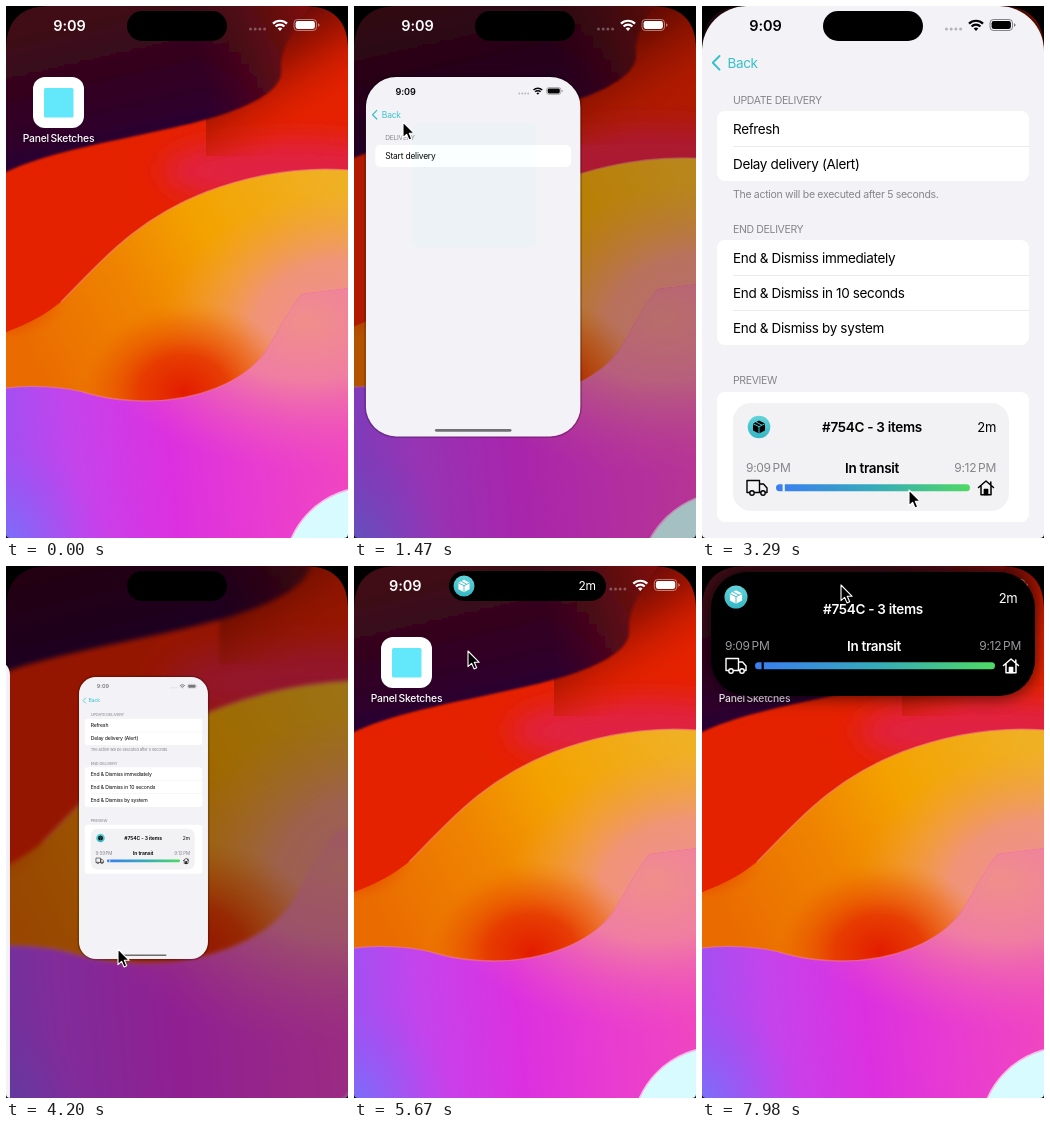
Animation, 342 px wide and 532 px high, one loop 8000 ms. Source, as an HTML page:

```html
<!DOCTYPE html>
<html lang="en">
<head>
<meta charset="utf-8">
<title>Delivery live activity</title>
<style>
html, body { margin: 0; width: 100%; height: 100%; overflow: hidden; background: #000; }
svg { display: block; width: 342px; height: 532px; }
text { font-family: Inter, Roboto, sans-serif; }
</style>
</head>
<body>
<svg id="stage" viewBox="0 0 342 532" xmlns="http://www.w3.org/2000/svg"></svg>
<script>
const LOOP = 8000;
const TEAL = '#35c2c9';

// ---------- markup helpers ----------
const text = (x, y, size, str, { fill = '#000', weight = 400, anchor = 'start', gap = -0.3 } = {}) =>
  `<text x="${x}" y="${y + size * 0.36}" font-size="${size}" fill="${fill}" font-weight="${weight}" text-anchor="${anchor}" letter-spacing="${gap}">${str}</text>`;
const rect = (x, y, w, h, r, fill, more = '') =>
  `<rect x="${x}" y="${y}" width="${w}" height="${h}" rx="${r}" fill="${fill}" ${more}/>`;
const stops = list => list.map(([o, c, a = 1]) =>
  `<stop offset="${o}" stop-color="${c}" stop-opacity="${a}"/>`).join('');
const linear = (id, x1, y1, x2, y2, list) =>
  `<linearGradient id="${id}" gradientUnits="userSpaceOnUse" x1="${x1}" y1="${y1}" x2="${x2}" y2="${y2}">${stops(list)}</linearGradient>`;
const radial = (id, x, y, rx, ry, list) =>
  `<radialGradient id="${id}" gradientUnits="userSpaceOnUse" cx="0" cy="0" r="1" gradientTransform="translate(${x} ${y}) scale(${rx} ${ry})">${stops(list)}</radialGradient>`;
const blur = (id, n) =>
  `<filter id="${id}" x="-30%" y="-30%" width="160%" height="160%"><feGaussianBlur stdDeviation="${n}"/></filter>`;

// ---------- wallpaper ----------
const NIGHT = 'M-120 200L0 166C45 145 110 135 170 121C232 107 277 88 275 64C273 45 286 20 314 -10V-200H-120Z';
const CREST = 'C-40 345 20 325 55 296C92 259 128 214 200 186C250 167 300 161 342 164';
const AMBER = `M-120 345${CREST}L520 195V600H-120Z`;
const FOLD = 'C-60 384 -20 381 0 382C22 379 60 380 84 388C102 393 120 395 140 395C188 395 238 378 260 345';
const VIOLET = `M-120 392${FOLD}C276 318 285 300 296 288L520 260V900H-120Z`;

const defs = `<defs>
${linear('dusk', 262, 0, 330, 105, [[0, '#4a0610'], [.45, '#a31400'], [1, '#e52200', 0]])}
${linear('night', 120, 0, 150, 130, [[0, '#400a18'], [.5, '#33051f'], [1, '#2b0032']])}
${linear('ember', 190, 40, 305, 20, [[0, '#6a0a0a', 0], [1, '#8c1204', .85]])}
${linear('amber', 20, 340, 320, 170, [[0, '#ea6c00'], [.35, '#ef8400'], [.62, '#f3a300'], [1, '#f0b024']])}
${radial('salmon', 340, 325, 185, 140, [[0, '#f08c98'], [.5, '#f09284', .9], [1, '#f09a50', 0]])}
${radial('left', -8, 285, 75, 55, [[0, '#e52200'], [.5, '#e52a00', .8], [1, '#ea6c00', 0]])}
${radial('core', 178, 386, 112, 92, [[0, '#e31c00'], [.4, '#e63400', .9], [.75, '#ea5a00', .45], [1, '#ee8000', 0]])}
${linear('violet', 0, 470, 342, 440, [[0, '#a050f2'], [.2, '#c444ec'], [.48, '#dc30e0'], [.75, '#e93cd0'], [1, '#f046c0']])}
${radial('haze', 300, 315, 225, 150, [[0, '#f08f8a'], [.4, '#f080a0', .95], [1, '#ee50c0', 0]])}
${radial('sky', -10, 545, 110, 120, [[0, '#7078fa'], [1, '#a050f2', 0]])}
${linear('track', 0, 0, 1, 0, [[0, '#3b7df2'], [.5, '#35aabb'], [1, '#4fd964']]).replace('userSpaceOnUse', 'objectBoundingBox')}
${linear('badge', 0, -11, 0, 11, [[0, '#62d3da'], [1, '#35b7c4']])}
${blur('soft', 1.2)}${blur('glow', 14)}${blur('shade', 9)}
<clipPath id="winClip"><rect id="winRect"/></clipPath>
<clipPath id="isleClip"><rect id="isleRect"/></clipPath>
</defs>`;

const wallpaper = `<g id="wall">
${rect(-150, -150, 700, 900, 0, '#e52200')}
<ellipse cx="285" cy="165" rx="130" ry="32" fill="#e02050" opacity=".85" filter="url(#glow)"/>
${rect(200, -150, 350, 300, 0, 'url(#dusk)')}
<g filter="url(#soft)"><path d="${NIGHT}" fill="url(#night)"/><path d="${NIGHT}" fill="url(#ember)"/></g>
${['amber', 'salmon', 'left', 'core'].map(f => `<path d="${AMBER}" fill="url(#${f})"/>`).join('')}
<path d="M55 296C92 259 128 214 200 186C250 167 300 161 342 164L400 172" fill="none" stroke="#ee8070" stroke-opacity=".7" stroke-width="1.4"/>
${['violet', 'haze', 'sky'].map(f => `<path d="${VIOLET}" fill="url(#${f})"/>`).join('')}
<path d="M-120 392${FOLD}" fill="none" stroke="#f07898" stroke-opacity=".6" stroke-width="1.4"/>
<circle cx="364" cy="567" r="86" fill="#d8fbff" stroke="#f8b8e8" stroke-width="1.5"/>
</g>`;

// ---------- shared pieces ----------
const status = (id, ink, dots) => `<g id="${id}">
<g class="clock">${text(63.5, 19.5, 14.5, '9:09', { fill: ink, weight: 600, anchor: 'middle', gap: -.1 })}</g>
<g class="signals">
${[0, 1, 2, 3].map(i => `<circle cx="${244.5 + i * 4.7}" cy="23" r="1.5" fill="${dots}"/>`).join('')}
<g fill="none" stroke="${ink}" stroke-width="2.2"><path d="M267 17.6a10 10 0 0 1 14 0M269.6 20.4a6.2 6.2 0 0 1 8.8 0"/></g>
<path d="M274 25l-2.3-2.5a3.3 3.3 0 0 1 4.6 0z" fill="${ink}"/>
<rect x="288" y="13.5" width="22.5" height="11" rx="3.4" fill="none" stroke="${ink}" stroke-opacity=".45"/>
${rect(289.6, 15.1, 19.3, 7.8, 2.1, ink)}
<path d="M312 17.2q1.6 .5 1.6 1.8t-1.6 1.8z" fill="${ink}" opacity=".5"/>
</g></g>`;

const badge = ink => `<circle r="11.3" fill="url(#badge)"/>
<path d="M0 -6.6L6 -3.5V3.5L0 6.6L-6 3.5V-3.5Z" fill="${ink}"/>
<path d="M-6 -3.3L0 -.3L6 -3.3M0 -.3V6.6M-3 -5L3 -1.8" fill="none" stroke="#45c2cc" stroke-width="1"/>`;

const trip = (l, r, y, ink, paper, dim) => {
  const m = (l + r) / 2 + 1;
  return `${text(l, y, 12, '9:09\u2009PM', { fill: dim })}
${text(r, y, 12, '9:12\u2009PM', { fill: dim, anchor: 'end' })}
${text(m, y, 13.5, 'In transit', { fill: ink, weight: 600, anchor: 'middle' })}
<g transform="translate(${l + 11} ${y + 20})" fill="${paper}" stroke="${ink}" stroke-width="1.4" stroke-linejoin="round">
<path d="M-10 -7.5H2.5V4.5H-10ZM2.5 -4H6.5L10 0V4.5H2.5Z"/><circle cx="-5" cy="5" r="2.2"/><circle cx="6" cy="5" r="2.2"/></g>
${rect(l + 30, y + 16.3, r - l - 56, 7, 3.5, 'url(#track)')}
${rect(l + 36.6, y + 16, 2.2, 7.6, 0, paper)}
<g transform="translate(${r - 10} ${y + 20})" fill="none" stroke="${ink}" stroke-width="1.5" stroke-linejoin="round" stroke-linecap="round">
<path d="M-7.5 -.5L0 -7L7.5 -.5M-5 -2V6.8H5V-2M4.8 -3V-6"/><path d="M-1.6 6.5V1.5H1.6V6.5Z" fill="${ink}"/></g>`;
};

const tile = `${rect(0, 0, 51, 51, 12, '#fff')}${rect(11, 11, 29.5, 29.5, 1.5, '#62e8fa')}`;

// ---------- app screens ----------
const head = (y, str) => text(31, y, 10.5, str, { fill: '#85858a', gap: -.35 });
const rows = (y, list) => rect(15, y, 312, list.length * 35, 8, '#fff') + list.map((s, i) =>
  (i ? rect(31, y + i * 35, 296, .6, 0, '#dcdce0') : '') + text(31, y + 17.8 + i * 35, 13.5, s, { gap: -.35 })).join('');

const startScreen = `<g id="start">${head(94, 'DELIVERY')}${rows(105, ['Start delivery'])}</g>`;
const listScreen = `<g id="list">
${head(94, 'UPDATE DELIVERY')}${rows(105, ['Refresh', 'Delay delivery (Alert)'])}
${text(31, 188, 10.5, 'The action will be executed after 5 seconds.', { fill: '#85858a' })}
${head(223, 'END DELIVERY')}${rows(234, ['End &amp; Dismiss immediately', 'End &amp; Dismiss in 10 seconds', 'End &amp; Dismiss by system'])}
${head(374, 'PREVIEW')}${rect(15, 386, 312, 130, 8, '#fff')}${rect(31, 397, 276, 108, 18, '#f2f2f4')}
<g transform="translate(57 421)">${badge('#000')}</g>
${text(170, 421, 13.5, '#754C - 3 items', { weight: 600, anchor: 'middle' })}
${text(294, 421, 13, '2m', { anchor: 'end' })}
${trip(44, 294, 462, '#000', '#f2f2f4', '#85858a')}</g>`;

const windowLayer = `<g id="win">
<rect id="winEdge" fill="none" stroke="#000" stroke-opacity=".22" stroke-width="3"/>
<g id="winBody" clip-path="url(#winClip)">
${rect(0, 0, 342, 760, 0, '#f2f2f7')}
<g id="page">${status('appStatus', '#000', '#b4b4b8')}
<path d="M17.5 50L10.8 56.8L17.5 63.6" fill="none" stroke="${TEAL}" stroke-width="2" stroke-linecap="round" stroke-linejoin="round"/>
${text(25.5, 56.8, 13.5, 'Back', { fill: TEAL, gap: -.35 })}
${startScreen}${listScreen}</g>
${rect(110, 0, 122, 4.4, 2.2, '#000', 'id="homeBar"')}
<g id="cover" transform="scale(${342 / 51})">${rect(0, 0, 51, 140, 0, '#fff')}${tile}</g>
</g></g>`;

const islandLayer = `<rect id="isleShade" fill="#000" filter="url(#shade)"/>
<rect id="isle" fill="#000"/>
<g clip-path="url(#isleClip)">
<g id="isleBadge">${badge('#fff')}</g>
<g id="isleTime">${text(0, 0, 13, '2m', { fill: '#fff', anchor: 'middle' })}</g>
<g id="isleBody">
${text(171, 43, 13.5, '#754C - 3 items', { fill: '#fff', weight: 600, anchor: 'middle' })}
${trip(23, 319, 80, '#fff', '#000', '#98989e')}</g></g>`;

const stage = document.getElementById('stage');
stage.innerHTML = `${defs}${wallpaper}
${rect(0, 0, 342, 532, 0, '#000', 'id="dim"')}
${rect(0, 94, 150, 480, 15, '#f2f2f7', 'id="neighbour"')}
<g id="grid"><g id="icon" transform="translate(27 71)">${tile}${rect(0, 0, 51, 51, 12, '#000', 'id="press"')}</g>
<g id="label" style="filter:drop-shadow(0 1px 1px rgba(0,0,0,.35))">${text(52.5, 132, 10.3, 'Panel\u2009Sketches', { fill: '#fff', weight: 500, anchor: 'middle', gap: -.2 })}</g></g>
${status('homeStatus', '#fff', 'rgba(255,255,255,.3)')}
${windowLayer}${islandLayer}
<path fill="#000" fill-rule="evenodd" d="M0 0H342V532H0ZM44 0Q0 0 0 44V528Q0 532 4 532H338Q342 532 342 528V44Q342 0 298 0Z"/>
<path id="cursor" d="M0 0V15.6L3.6 12.3L6 17.9L8.7 16.8L6.3 11.3H11.2Z" fill="#000" stroke="#fff" stroke-width="1.1" stroke-linejoin="round"/>`;

// ---------- motion ----------
const el = id => document.getElementById(id);
const set = (id, attrs) => { for (const k in attrs) el(id).setAttribute(k, attrs[k]); };
const fade = (id, a) => set(id, { opacity: a });
const clamp = v => Math.max(0, Math.min(1, v));
const mix = (a, b, p) => a + (b - a) * p;
const mixAll = (a, b, p) => a.map((v, i) => mix(v, b[i], p));
const ramp = (t, a, b) => clamp((t - a) / (b - a));
const ease = (t, a, b) => { const p = ramp(t, a, b); return p * p * (3 - 2 * p); };
const spring = (t, from, rate) => {
  const k = Math.max(0, t - from) / 1000 * rate;
  return Math.min(1, (1 - (1 + k) * Math.exp(-k)) * 1.005);
};

const OPEN = 1260, DRAG = 4060, DROP = 4200, LANDED = 4550;
// centre x, centre y, width, height, corner
const ICON = [52.5, 96.5, 51, 51, 12];
const FULL = [171, 370.5, 342, 741, 45];
const CARD = [137.5, 252, 129, 282, 17];
// x, y, width, height, corner
const PILL = [121, 5, 100, 30, 15];
const COMPACT = [95, 5, 157, 30, 15];
const WIDE = [9, 6, 324, 124, 36];

const POINTER = [
  [280, 302, 532], [700, 36, 114], [840, 49, 116], [3010, 49, 116], [3290, 207, 484],
  [DRAG, 207, 484], [DROP, 112, 383], [4970, 112, 383], [5600, 114, 85], [5700, 114, 85],
  [5950, 132, 27], [7770, 132, 27], [7980, 139, 19]
];

function pointerAt(t) {
  const i = POINTER.findIndex(k => k[0] > t);
  if (i < 0) return POINTER[POINTER.length - 1];
  if (i === 0) return POINTER[0];
  const a = POINTER[i - 1], b = POINTER[i];
  return mixAll(a, b, ease(t, a[0], b[0]));
}

function windowAt(t, opened, closed) {
  if (t >= DROP) return mixAll(CARD, ICON, closed);
  if (t >= DRAG) return mixAll(FULL, CARD, ramp(t, DRAG, DROP));
  const box = mixAll(ICON, FULL, opened);
  box[3] = mix(ICON[3], FULL[3], opened ** 1.4);
  return box;
}

function drawWindow(t, opened, closed) {
  const shown = t > OPEN && t < LANDED;
  el('win').style.display = shown ? '' : 'none';
  if (!shown) return;
  const [cx, cy, w, h, r] = windowAt(t, opened, closed);
  const s = w / 342, x = cx - w / 2, y = cy - h / 2;
  set('winBody', { transform: `translate(${x} ${y}) scale(${s})` });
  set('winRect', { x: 0, y: 0, width: 342, height: h / s, rx: r / s });
  set('winEdge', { x, y, width: w, height: h, rx: r });
  set('homeBar', { y: h / s - 12 });
  set('page', { transform: `translate(0 ${(1 - s) * 9})` });
  fade('homeBar', .55);
  fade('appStatus', t < DRAG ? 1 : 1 - .5 * ramp(t, DRAG, DROP));
  fade('cover', t < DRAG ? clamp(1 - opened / .58) : clamp(closed / .6));
  const swap = ease(t, 2520, 2800);
  fade('start', 1 - swap);
  fade('list', swap);
}

function drawHome(t, opened, closed) {
  const leaving = t >= DRAG;
  const zoom = leaving ? 1 + .22 * (1 - spring(t, DROP, 8)) : 1 + .09 * opened;
  set('wall', { transform: `translate(140 385) scale(${zoom}) translate(-140 -385)` });
  const haze = leaving ? 1.6 * (1 - closed) : 0;
  el('wall').style.filter = haze > .1 ? `blur(${haze}px)` : '';
  fade('dim', leaving ? .35 * (1 - closed) : .42 * opened);

  const peek = 4 * (1 - Math.abs(t - DROP) / 140);
  el('neighbour').style.display = peek > 0 ? '' : 'none';
  set('neighbour', { x: peek - 150 });

  const g = leaving ? 1 - .1 * (1 - spring(t, DROP, 8.5)) : 1;
  set('grid', { transform: `translate(171 266) scale(${g}) translate(-171 -266)` });
  fade('label', leaving ? ease(t, 4250, 4450) : clamp(1 - opened * 2));
  el('icon').style.display = t > OPEN && t < LANDED ? 'none' : '';
  fade('press', leaving ? .07 * (1 - ramp(t, LANDED, 4760)) : .3 * ease(t, 1050, 1200));

  const shift = 12.3 * spring(t, 4560, 9);
  fade('homeStatus', leaving ? ease(t, 4300, 4480) : 1);
  el('homeStatus').querySelector('.clock').setAttribute('transform', `translate(${-shift} 0)`);
  el('homeStatus').querySelector('.signals').setAttribute('transform', `translate(${shift} 0)`);
}

function drawIsland(t) {
  const small = spring(t, 4480, 7.6), big = spring(t, 6600, 9);
  const [x, y, w, h, r] = mixAll(mixAll(PILL, COMPACT, small), WIDE, big);
  const grow = 3 * ease(t, 6370, 6580) * (1 - big);
  const box = { x: x - grow, y: y - grow / 2, width: w + 2 * grow, height: h + grow * 1.5, rx: r + grow / 2 };
  ['isle', 'isleRect', 'isleShade'].forEach(id => set(id, box));
  fade('isleShade', .75 * big);

  const seen = clamp((small - .35) / .5);
  const badgeScale = mix(.93, 1.02, big) * mix(.5, 1, seen);
  set('isleBadge', { transform: `translate(${mix(x + 15, 34, big)} ${mix(20, 31, big)}) scale(${badgeScale})`, opacity: seen });
  set('isleTime', { transform: `translate(${mix(x + w - 19, 306, big)} ${mix(20, 32, big)}) scale(${mix(.92, 1, big)})`, opacity: seen });
  const s = mix(.5, 1, big);
  set('isleBody', { transform: `translate(171 6) scale(${s}) translate(-171 -6)`, opacity: clamp((big - .35) / .5) });
}

function draw(t) {
  const opened = Math.min(1, spring(t, OPEN, 8.9));
  const closed = spring(t, DROP, 16);
  drawHome(t, opened, closed);
  drawWindow(t, opened, closed);
  drawIsland(t);
  const [, px, py] = pointerAt(t);
  set('cursor', { transform: `translate(${px} ${py})`, opacity: t < 280 ? 0 : 1 });
}

const begin = performance.now();
function tick() {
  draw((performance.now() - begin) % LOOP);
  requestAnimationFrame(tick);
}
tick();
</script>
</body>
</html>
```
